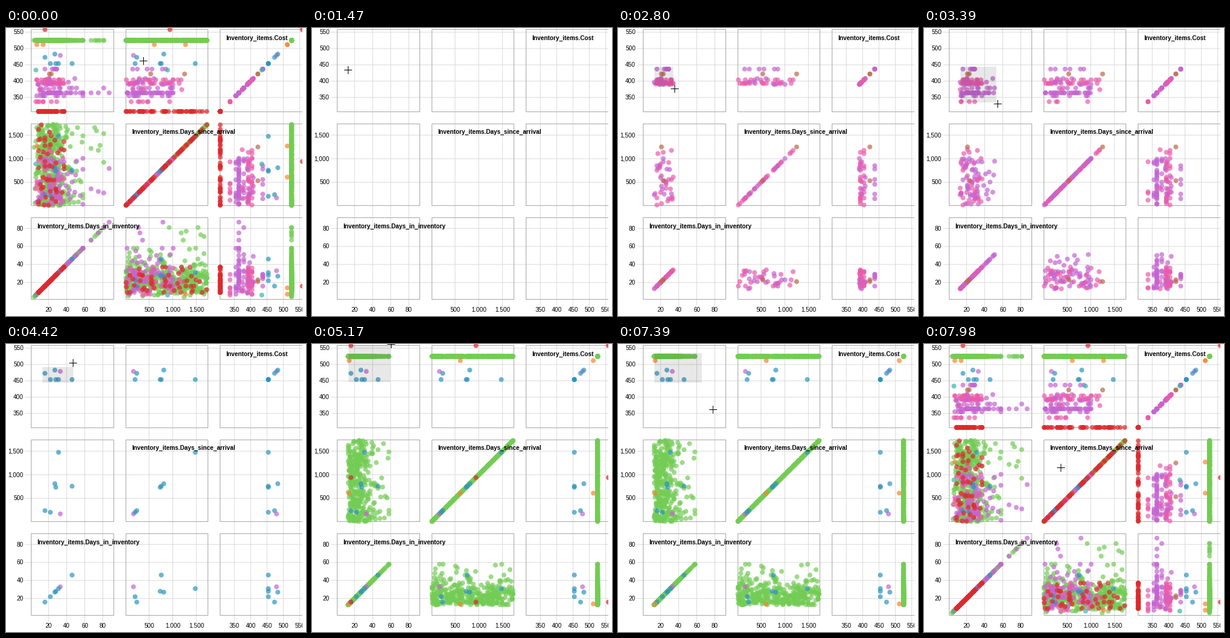
A matplotlib script for the animation above (8 s loop, 494 px wide and 476 px high).

```python
import math

import numpy as np
import matplotlib.pyplot as plt
from matplotlib.animation import FuncAnimation
from matplotlib.colors import to_rgba
from matplotlib.patches import Rectangle

W, H, VIEW_W, DPI = 494, 476, 488, 100
INTERVAL, FRAMES = 50, 160
STEP_MS = 147.8          # the picture refreshes at this slower pace
PIXEL = 72 / DPI         # one pixel in points
PITCH, SIZE = 155.35, 135.5
LEFTS = [41.8 + PITCH * i for i in range(3)]
TOPS = [2.7 + PITCH * i for i in range(3)]
FONT = dict(family="Liberation Sans", fontsize=10 * PIXEL, color="black",
            va="baseline")

# Fields: name, domain, ticks
FIELDS = (("Days_in_inventory", (1, 92), range(20, 81, 20)),
          ("Days_since_arrival", (7, 1744), range(500, 1501, 500)),
          ("Cost", (306.5, 558), range(350, 551, 50)))

GREEN, PURPLE, PINK, RED = "#73cc54", "#c465d1", "#ec5bab", "#dc2a2e"
BLUE, ORANGE, BROWN, TEAL = "#2c94bf", "#f88431", "#b86a48", "#35b8a8"

# Pointer way points: (step, x, y)
POINTER = ((0, 226, 54), (2, 222, 58), (7, 59, 69), (14, 59, 69),
           (23, 121, 125), (26, 121, 125), (30, 110, 31), (35, 130, 0),
           (43, 114, 13), (45, 113, 38), (47, 138, 15), (50, 156, 108),
           (54, 225, 204))
ANCHOR = (59.5, 63.5)
PRESS, RELEASE, CLEAR = 10, 47, 52
BRUSH_LAG = 0.3

rng = np.random.default_rng(12)


def fraction(field, value):
    lo, hi = FIELDS[field][1]
    return (value - lo) / (hi - lo)


def to_x(field, value):
    return LEFTS[field] + fraction(field, value) * SIZE


def to_y(field, value):
    return TOPS[2 - field] + (1 - fraction(field, value)) * SIZE


def crisp(value):
    return math.floor(value) + 0.5


def cloud(color, n, costs, mean, shape=4.5, span=1730, power=1.2,
          limits=(1, 58)):
    """Random items of one colour whose costs come from a few levels."""
    days = np.clip(np.round(rng.gamma(shape, mean / shape, n)), *limits)
    since = 10 + span * rng.random(n) ** power
    return [(d, s, c, color) for d, s, c in zip(days, since, rng.choice(costs, n))]


def build_items():
    green = cloud(GREEN, 390, [525], 23)
    green += cloud(GREEN, 7, [525], 78, shape=90, limits=(65, 92))

    mixed = cloud(PURPLE, 40, [364, 364, 364, 355], 28, span=1080)
    mixed += cloud(PURPLE, 22, [379, 390, 397, 408], 26, span=1080)
    mixed += cloud(PINK, 36, [374, 393, 393, 404], 24, span=1250)
    mixed += cloud(PINK, 7, [337], 20, span=1100)
    mixed += cloud(PURPLE, 6, [437], 22, shape=30, span=900)
    mixed += cloud(PURPLE, 4, [364, 379], 79, shape=120, limits=(66, 90))
    order = rng.permutation(len(mixed))

    singles = [(33, 170, 479, PURPLE), (16, 240, 473, BLUE),
               (27, 810, 483, BLUE), (22, 205, 454, BLUE),
               (28, 735, 454, BLUE), (31, 1475, 454, BLUE),
               (46, 757, 454, BLUE), (23, 535, 422, BROWN),
               (21, 1250, 422, BROWN), (14, 610, 512, ORANGE),
               (7, 1270, 512, ORANGE), (6, 890, 434, TEAL),
               (16, 940, 558, RED)]
    red = cloud(RED, 46, [307], 21, span=1720, limits=(9, 37))
    return green + [mixed[i] for i in order] + singles + red


def draw_static(ax):
    def grid_line(xs, ys):
        ax.plot(xs, ys, color="#dadada", lw=PIXEL, snap=False, zorder=1)

    for field, (name, _, ticks) in enumerate(FIELDS):
        for tick in ticks:
            x, y = to_x(field, tick), to_y(field, tick)
            grid_line((x, x), (0, 459))
            grid_line((32, VIEW_W), (y, y))
            label = f"{tick:,}"
            ax.text(29, y + 3.4, label, ha="right", **FONT)
            ax.text(x, 469, label.replace(",", "."), ha="center",
                    clip_on=True, **FONT)
        ax.text(LEFTS[field] + 10, TOPS[2 - field] + 17,
                "Inventory_items." + name, weight="bold", clip_on=True,
                zorder=5, **FONT)

    for left in LEFTS:
        for top in TOPS:
            x0, y0 = crisp(left), crisp(top)
            x1, y1 = crisp(left + SIZE), crisp(top + SIZE)
            ax.add_patch(Rectangle((x0, y0), x1 - x0, y1 - y0, fill=False,
                                   ec="#a6a6a6", lw=PIXEL, snap=False,
                                   zorder=2))


def pointer_at(step):
    steps, xs, ys = zip(*POINTER)
    return np.interp(step, steps, xs), np.interp(step, steps, ys)


items = build_items()
values = np.array([item[:3] for item in items], dtype=float)
colors = np.array([to_rgba(item[3], 0.7) for item in items])
panel_points = [
    np.column_stack((to_x(col, values[:, col]), to_y(row, values[:, row])))
    for row in (2, 1, 0) for col in (0, 1, 2)]
brush_x, brush_y = panel_points[0].T

fig = plt.figure(figsize=(W / DPI, H / DPI), dpi=DPI, facecolor="white")
ax = fig.add_axes((0, 0, VIEW_W / W, 1))
ax.set(xlim=(0, VIEW_W), ylim=(H, 0))
ax.axis("off")
draw_static(ax)

dots = ax.scatter([], [], s=(8 * PIXEL) ** 2, linewidths=0, zorder=3)
brush = ax.add_patch(Rectangle(ANCHOR, 0, 0, fc="black", alpha=0.09, lw=0,
                               zorder=4))
bars = [ax.plot([], [], color="black", lw=PIXEL, snap=False, zorder=6,
                solid_capstyle="butt")[0] for _ in range(2)]


def update(frame):
    step = int((frame * INTERVAL + 55) / STEP_MS)

    x, y = map(crisp, pointer_at(step))
    bars[0].set_data((x - 6.5, x + 6.5), (y, y))
    bars[1].set_data((x, x), (y - 6.5, y + 6.5))

    brushing = PRESS <= step < CLEAR
    brush.set_visible(brushing)
    shown = np.ones(len(items), dtype=bool)
    if brushing:
        x0, y0 = ANCHOR
        x1, y1 = pointer_at(min(step - BRUSH_LAG, RELEASE))
        x1 = max(x0, x1)
        top, bottom = min(y0, y1), max(y0, y1)
        brush.set_bounds(x0, top, x1 - x0, bottom - top)
        shown = ((brush_x >= x0) & (brush_x <= x1)
                 & (brush_y >= top) & (brush_y <= bottom))

    dots.set_offsets(np.vstack([points[shown] for points in panel_points]))
    dots.set_facecolor(np.tile(colors[shown], (len(panel_points), 1)))
    return [dots, brush, *bars]


anim = FuncAnimation(fig, update, frames=FRAMES, interval=INTERVAL,
                     repeat=True, repeat_delay=0, blit=False)
plt.show()
```
